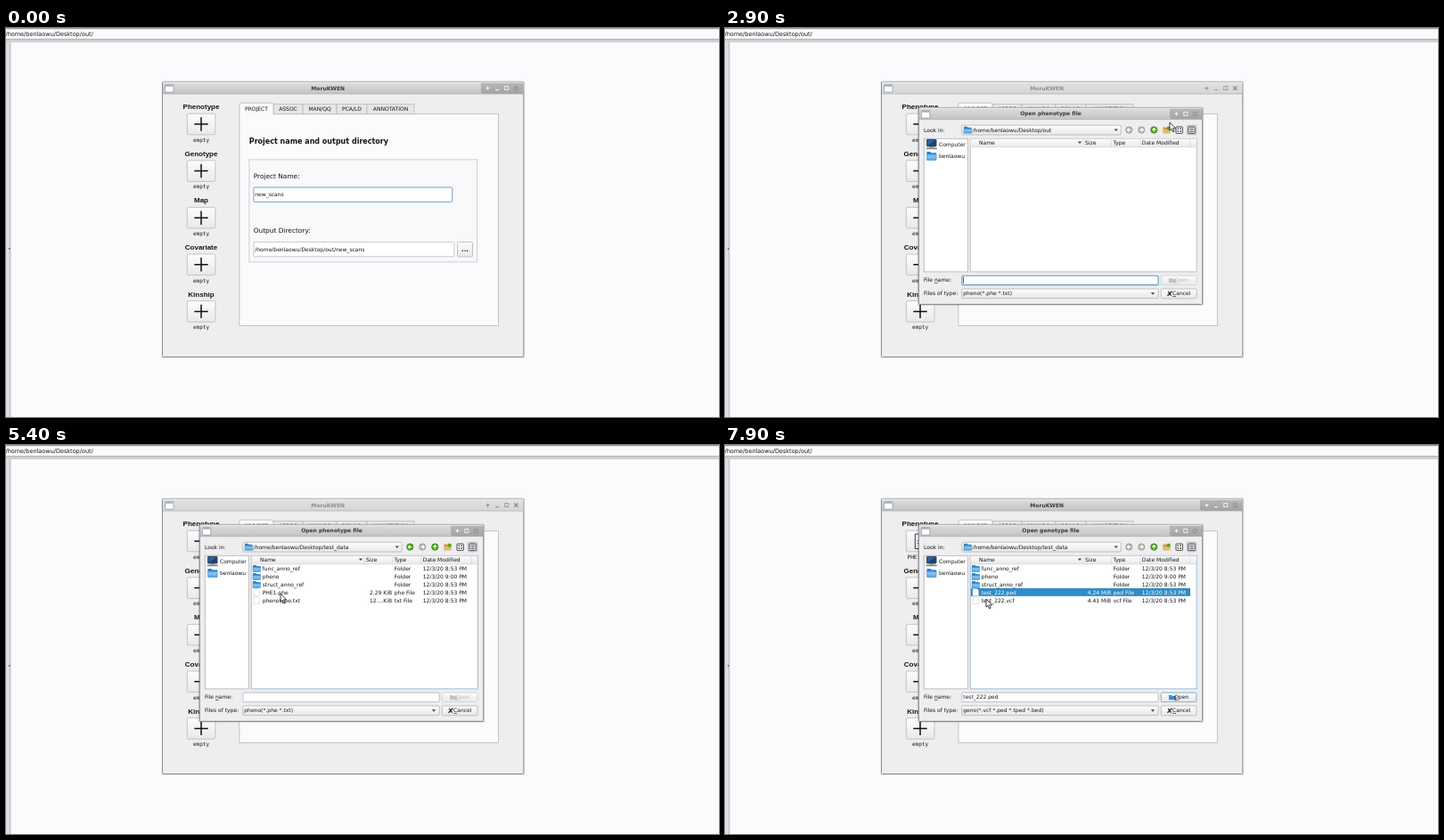
Animation, 800 px wide and 437 px high, one loop 8 s. Source, as an HTML page:

```html
<!DOCTYPE html>
<html lang="en">
<head>
<meta charset="utf-8">
<title>Opening input files</title>
<style>
  html, body { margin: 0; width: 100%; height: 100%; overflow: hidden; background: #fbfafd; }
  svg { display: block; width: 800px; height: 437px; font: 6px "DejaVu Sans", sans-serif; }
  text { white-space: pre; fill: #151515; }
  .bold { font-weight: bold; }
  .side { font: bold 8px "Liberation Sans", Arial, sans-serif; }
  .mono { font: 6px "DejaVu Sans Mono", monospace; }
  .u { text-decoration: underline; text-decoration-thickness: .5px; }
</style>
</head>
<body>
<svg id="stage" viewBox="0 0 800 437">
  <defs>
    <linearGradient id="bar" x2="0" y2="1"><stop stop-color="#dedede"/><stop offset="1" stop-color="#c3c3c3"/></linearGradient>
    <linearGradient id="barOff" x2="0" y2="1"><stop stop-color="#e2e2e2"/><stop offset="1" stop-color="#d6d6d6"/></linearGradient>
    <linearGradient id="knob" x2="0" y2="1"><stop stop-color="#b9b9b9"/><stop offset="1" stop-color="#a3a3a3"/></linearGradient>
    <linearGradient id="btn" x2="0" y2="1"><stop stop-color="#fdfdfd"/><stop offset="1" stop-color="#e9e8ea"/></linearGradient>
    <linearGradient id="blue" x2="0" y2="1"><stop stop-color="#3f94d8"/><stop offset=".4" stop-color="#8cc6f2"/><stop offset="1" stop-color="#4b9fe0"/></linearGradient>
  </defs>
  <g id="desk"></g>
  <g id="main"></g>
  <g id="dialog"></g>
  <path id="pointer" d="M0 0V9.2L2.1 7.3L3.6 10.8L5.1 10.1L3.6 6.8H6.5Z" fill="#fff" stroke="#111" stroke-width=".8" stroke-linejoin="round"/>
</svg>
<script>
const LOOP = 8000, STEP = 100;
const APP = 'MoruKWEN', USER = 'benlaowu', DESKTOP = `/home/${USER}/Desktop`;
const $ = id => document.getElementById(id);

// Drawing helpers
const rect = (x, y, w, h, fill, stroke, r = 0, sw = .8) =>
  `<rect x="${x}" y="${y}" width="${w}" height="${h}" rx="${r}" fill="${fill}"` +
  (stroke ? ` stroke="${stroke}" stroke-width="${sw}"` : '') + '/>';
const line = (d, color, w = .8) => `<path d="${d}" fill="none" stroke="${color}" stroke-width="${w}"/>`;
const shape = (d, fill) => `<path d="${d}" fill="${fill}"/>`;
const text = (x, y, s, o = {}) =>
  `<text x="${x}" y="${y}" class="${o.cls || ''}" text-anchor="${o.anchor || 'start'}"` +
  ` style="${o.size ? `font-size:${o.size}px;` : ''}${o.fill ? `fill:${o.fill}` : ''}">${s}</text>`;
const under = c => `<tspan class="u">${c}</tspan>`;
const mid = { anchor: 'middle' };

const folder = (x, y) =>
  shape(`M${x} ${y}h3.5l1 1h4v2h-8.5z`, '#2d7fc4') + rect(x, y + 2, 8.6, 5.4, 'url(#blue)', '#3283c5', .5, .5);
const page = (x, y) =>
  `<path d="M${x} ${y}h4.5l2 2v6h-6.5z" fill="#fcfcfc" stroke="#c9c9c9" stroke-width=".5"/>`;
const arrowDown = (x, y) => shape(`M${x - 2.2} ${y - 1.1}h4.4l-2.2 2.4z`, '#444');

function titleBar(x, y, w, h, label, active, knobX) {
  const ink = active ? '#3a3a3a' : '#8d8d8d', cy = y + h / 2 + .3;
  const bx = knobX + 7.5, gap = (x + w - 8 - bx) / (w > 350 ? 3 : 2);
  const at = i => bx + gap * i;
  let s = rect(x, y, w, h, active ? 'url(#bar)' : 'url(#barOff)');
  if (active) s += shape(`M${knobX} ${y}H${x + w}V${y + h}H${knobX + 3}Q${knobX} ${y + h} ${knobX} ${y + h - 3}z`, 'url(#knob)');
  s += line(`M${x} ${y + .8}h${w}`, '#f2f2f2', .7) + line(`M${x} ${y + h}h${w}`, '#aaa', .7);
  s += rect(x + 2.5, y + 3, 9.5, 8.5, '#fdfdfd', '#8793a0', .4, .7) + rect(x + 3, y + 3.4, 8.5, 1.7, '#9fb4cb');
  s += text(x + w / 2 - (w > 350 ? 17 : 11), y + h / 2 + 2.3, label, { cls: 'bold', anchor: 'middle', fill: ink });
  const last = w > 350 ? 3 : 2, ic = active ? '#fafafa' : '#8f8f8f';
  const edge = active ? '#5c5c5c' : '#9c9c9c';
  s += line(`M${at(0) - 2} ${cy}h4M${at(0)} ${cy - 2}v4`, ic, 1);
  if (last === 3) s += line(`M${at(1) - 2} ${cy + 2}h4`, ic, 1);
  s += rect(at(last - 1) - 2, cy - 2, 4, 4, 'none', ic, 0, .8);
  s += line(`M${at(last) - 2} ${cy - 2}l4 4m0 -4l-4 4`, edge, 1.5) + line(`M${at(last) - 2} ${cy - 2}l4 4m0 -4l-4 4`, ic, .8);
  return s;
}

function drawDesk() {
  return rect(0, 0, 800, 437, '#fbfafd') + rect(0, 0, 800, 1.2, '#99989c') +
    rect(0, 12.3, 800, 1.2, '#99989c') + rect(0, 13.5, 800, 2.6, '#d0cfd2') +
    rect(0, 16.1, 3.8, 421, '#dcdce4') + rect(3.8, 16.1, 1.6, 421, '#c2c2ca') + rect(3, 247, 1.6, 2, '#777') +
    text(-.5, 9, DESKTOP + '/out/', { size: 6.5 });
}

const INPUTS = ['Phenotype', 'Genotype', 'Map', 'Covariate', 'Kinship'];
const TABS = [['ASSOC', 300, 333], ['MAN/QQ', 333, 371], ['PCA/LD', 371, 405], ['ANNOTATION', 405, 458]];

function inputButton(name, i, s) {
  const y = 96 + i * 52.6, loaded = i === 0 && s.loaded;
  const fill = s.pressed === i ? '#d6d5d8' : s.hover === i ? '#fff' : 'url(#btn)';
  const icon = loaded
    ? line(`M213.3 ${y + 4}h8l4 4v12.5h-12z m8 0v4h4 M216 ${y + 11.5}h6.5m-6.5 3h6.5`, '#222', .9)
    : line(`M211.3 ${y + 12}h15.4m-7.7 -7.7v15.4`, '#111', 1.5);
  return text(219, y - 4.8, name, { cls: 'side', anchor: 'middle' }) +
    rect(203.3, y + .2, 31.6, 23.6, fill, '#b9b8bb', 1.5) + icon +
    text(219, y + 31.8, loaded ? 'PHE1.phe' : 'empty', { cls: 'mono', anchor: 'middle' });
}

function drawMain(s) {
  const pane = '#fbfafd', edge = '#b9b8bb';
  let out = rect(174.6, 60, 407.4, 311, '#000').replace('/>', ' opacity=".1"/>');
  out += rect(175.5, 60.3, 405.3, 309.2, '#eeedef', '#8e8e90', 1, 1);
  out += titleBar(176, 60.6, 404.4, 13.4, APP, s.mainActive, 533);
  out += INPUTS.map((n, i) => inputButton(n, i, s)).join('');
  out += rect(261.9, 96.7, 290.7, 237.8, pane, edge);
  for (const [n, a, b] of TABS)
    out += rect(a, 85.5, b - a, 11.2, '#e6e5e8', edge) + text((a + b) / 2, 93.2, n, mid);
  out += shape('M261.9 97.3V86Q261.9 84.2 264 84.2H298Q300 84.2 300 86V97.3z', pane) +
    line('M261.9 97V86Q261.9 84.2 264 84.2H298Q300 84.2 300 86V96.7', edge) + text(281, 93.2, 'PROJECT', mid);
  out += text(272.8, 130.4, 'Project name and output directory', { cls: 'bold', size: 8 });
  out += rect(272.9, 147.9, 255.7, 115, '#f9f8fb', '#c4c3c7');
  out += text(277.7, 169, 'Project Name:', { size: 7.4 }) + text(277.7, 230.4, 'Output Directory:', { size: 7.4 });
  out += rect(277.9, 179, 222.9, 16.4, '#fff', s.mainActive ? '#6a9fc4' : '#b5b5b8', 1.3, 1) + text(279.3, 189.4, 'new_scans');
  out += rect(277.9, 240.4, 225, 16.4, '#fff', '#bbbabe', 1.3) + text(279.3, 250.8, DESKTOP + '/out/new_scans');
  out += rect(506.5, 240.4, 17, 16.6, 'url(#btn)', '#b5b4b8', 1.5) + text(515, 250.6, '...', { cls: 'bold', size: 7, anchor: 'middle' });
  return out;
}

// Folder contents: name, size, type, date
const dir = (name, date) => [name, '', 'Folder', date];
const D853 = '12/3/20 8:53 PM', D905 = '12/3/20 9:05 PM';
const REFS = [dir('func_anno_ref', D853), dir('pheno', '12/3/20 9:00 PM'), dir('struct_anno_ref', D853)];
const LISTS = {
  out: [],
  desktop: [
    dir(APP + '_Realease', D905), dir('Tools_x64', '8/27/19 5:30 PM'), dir('vornkey-7.7p1', '7/17/1...:05 AM'),
    dir('out', D905), dir('test', D853), dir('test_data', D905),
    ['key.txt', '2.95 KiB', 'txt File', '7/16/1...:52 PM']
  ],
  pheno: [...REFS, ['PHE1.phe', '2.29 KiB', 'phe File', D853], ['phenotype.txt', '12....KiB', 'txt File', D853]],
  geno: [...REFS, ['test_222.ped', '4.24 MiB', 'ped File', D853], ['test_222.vcf', '4.41 MiB', 'vcf File', D853]]
};
const PATHS = { out: '/out', desktop: '', pheno: '/test_data', geno: '/test_data' };

function toolbar(s) {
  const round = (x, on, d) =>
    `<circle cx="${x}" cy="114.5" r="3.7" fill="${on ? '#45a80c' : '#b4b4b4'}" stroke="${on ? '#2f7d05' : '#8f8f8f'}" stroke-width=".6"/>` +
    line(d, '#fff', 1.1);
  return round(453.3, s.back, 'M455.6 114.5h-4.2m2 -2l-2 2l2 2') +
    round(467.3, false, 'M465 114.5h4.2m-2 -2l2 2l-2 2') +
    round(481.3, true, 'M481.3 116.8v-4.2m-2 2l2 -2l2 2') +
    shape('M491.5 111.5h3l1 1h4v5.8h-8z', '#c99a3d') + rect(491.8, 114, 7.4, 4.2, '#e4bd62') +
    `<circle cx="497.6" cy="112.6" r="2.2" fill="#58a618"/>` +
    rect(506, 111, 7.4, 7.4, '#fff', '#333', .6, .9) +
    line('M507.6 113.2h1.6m1.2 0h1.6M507.6 116h1.6m1.2 0h1.6', '#333', 1.3) +
    rect(518.3, 109.2, 10.6, 10.6, '#d3d2d5', '#aaa', 1, .6) +
    rect(520, 111, 7.2, 7.4, '#fff', '#333', .6, .9) +
    line('M521.5 113h4.2m-4.2 1.8h4.2m-4.2 1.8h4.2', '#333', .8);
}

function fileRow([name, size, type, date], i, sel) {
  const y = 140.8 + i * 9, o = { fill: sel ? '#fff' : '' };
  return (sel ? rect(275.8, y - 7, 246.2, 9, '#308cc6') : '') +
    (type === 'Folder' ? folder(277, y - 5.8) : page(278, y - 6.2)) +
    text(287.7, y, name, o) + text(433, y, size, { ...o, anchor: 'end' }) +
    text(435.8, y, type, o) + text(467.8, y, date, o);
}

function drawDialog(s) {
  if (!s.open) return '';
  const edge = '#b3b2b6', rows = LISTS[s.list], picked = s.sel >= 0;
  let out = rect(215.8, 89.3, 321.4, 222.6, '#000', '', 1).replace('/>', ' opacity=".12"/>');
  out += rect(217.3, 89.4, 318.4, 221, '#eeedef', '#858587', 1, 1);
  out += titleBar(217.8, 89.6, 317.4, 13, `Open ${s.geno ? 'genotype' : 'phenotype'} file`, true, 499);

  out += text(223, 116.7, 'Look in:') + rect(265.8, 109.2, 178.4, 10.8, 'url(#btn)', edge, 1.2);
  out += folder(268, 110.8) + text(277.6, 116.7, DESKTOP + PATHS[s.list]) + arrowDown(438.8, 114.6) + toolbar(s);

  out += rect(223.3, 124.3, 49, 149.6, '#fff', edge) + text(240, 133, 'Computer') + text(240, 146, USER);
  out += rect(226.5, 125.3, 10.5, 7.6, '#2c5f9e', '#343a42', .5, .9) + shape('M227 132.3L236.6 126v6.3z', '#1d4173') +
    rect(229, 133.4, 5.5, 1, '#666') + rect(225.8, 134.5, 12, 1.7, '#858585');
  out += shape('M226.5 139h4l1 1.2h5.6v2h-10.6z', '#2d7fc4') + rect(226.5, 141.3, 10.6, 7.2, 'url(#blue)', '#3283c5', .5, .5);

  out += rect(275.2, 124.3, 254, 149.6, '#fff', s.focus ? edge : '#86aecb');
  out += rect(275.6, 124.7, 253.2, 8.9, 'url(#btn)') + line('M275.6 133.8h253.2', '#c8c7ca', .6) +
    line('M402 125v8.6M433.4 125v8.6M465.8 125v8.6M521.8 125v8.6', '#cfced2', .6);
  out += text(285, 131, 'Name') + arrowDown(398, 128.6) + text(404, 131, 'Size') +
    text(435.5, 131, 'Type') + text(467.8, 131, 'Date Modified');
  out += rows.map((r, i) => fileRow(r, i, i === s.sel)).join('');

  out += text(223, 285.2, `File ${under('n')}ame:`) + text(223, 300.2, 'Files of type:');
  out += rect(265.8, 278.2, 220.4, 10.4, '#fff', s.focus ? '#5d9fc0' : edge, 1.2, s.focus ? 1.1 : .8);
  if (s.caret) out += line('M267.5 279.8v7.2', '#111', .7);
  if (picked) out += text(267.3, 285.2, rows[s.sel][0]);
  out += rect(265.8, 293, 220.4, 10.6, 'url(#btn)', edge, 1.2) +
    text(267.3, 300.2, s.geno ? 'geno(*.vcf *.ped *.tped *.bed)' : 'pheno(*.phe *.txt)') + arrowDown(480, 298.4);

  out += rect(489.3, 278.2, 39.7, 10.4, 'url(#btn)', picked ? '#6d9fc0' : '#d0cfd2', 1.2) +
    shape('M498 281h3l1 1h4v4.3h-8z', picked ? '#3c8bcf' : '#c4c3c6') +
    text(504, 285.3, under('O') + 'pen', { fill: picked ? '' : '#b9b8bb' });
  out += rect(489.3, 293, 39.7, 10.8, 'url(#btn)', edge, 1.2) +
    line('M496.5 300.8l5 -5.2m-4.2 .6l3.2 4.4', '#222', 1.3) + text(502, 300.3, under('C') + 'ancel');
  return out;
}

// Pointer waypoints: time, x, y
const TRAIL = [
  [200, 300, 172], [500, 221, 108], [900, 221, 108], [1300, 460, 124], [1600, 505, 102], [1900, 501, 107],
  [2000, 499, 106], [2900, 499, 106], [3300, 481, 114], [3700, 481, 114], [4300, 295, 183], [4800, 295, 183],
  [5300, 308, 167], [5700, 308, 167], [6200, 222, 161], [6500, 222, 161], [6700, 225, 163], [7200, 225, 163],
  [7300, 228, 143], [7400, 318, 167], [7500, 318, 167], [7700, 297, 168], [7900, 293, 173]
];

function pointerAt(t) {
  const i = TRAIL.findIndex(p => p[0] >= t);
  if (i < 1) return TRAIL[i < 0 ? TRAIL.length - 1 : 0].slice(1);
  const [t0, x0, y0] = TRAIL[i - 1], [t1, x1, y1] = TRAIL[i];
  const k = (t - t0) / (t1 - t0), e = k * k * (3 - 2 * k);
  return [x0 + (x1 - x0) * e, y0 + (y1 - y0) * e];
}

function stateAt(t) {
  const within = (a, b) => t >= a && t < b;
  const geno = t >= 6600, open = within(700, 5700) || geno;
  const focus = geno ? t < 7600 : t < 4600;
  return {
    geno, open, focus,
    mainActive: !open || t >= 7900,
    loaded: t >= 5700,
    hover: within(400, 700) ? 0 : within(6100, 6600) ? 1 : -1,
    pressed: within(600, 700) ? 0 : within(6400, 6500) ? 1 : -1,
    list: t < 3500 ? 'out' : t < 4800 ? 'desktop' : geno ? 'geno' : 'pheno',
    sel: within(4600, 4800) ? 5 : within(5500, 5700) || t >= 7600 ? 3 : -1,
    back: !geno && t >= 3500,
    caret: focus && (t - (geno ? 6600 : 700)) % 1000 < 500
  };
}

let shown = -1;
function paint(t) {
  if (t === shown) return;
  shown = t;
  const s = stateAt(t), [x, y] = pointerAt(t), p = $('pointer');
  $('main').innerHTML = drawMain(s);
  $('dialog').innerHTML = drawDialog(s);
  p.setAttribute('transform', `translate(${x.toFixed(1)} ${y.toFixed(1)})`);
  p.setAttribute('visibility', t < 200 ? 'hidden' : 'visible');
}

$('desk').innerHTML = drawDesk();
const start = performance.now();
function tick() {
  const t = (performance.now() - start) % LOOP;
  paint(Math.floor(t / STEP) * STEP);
  requestAnimationFrame(tick);
}
tick();
</script>
</body>
</html>
```
